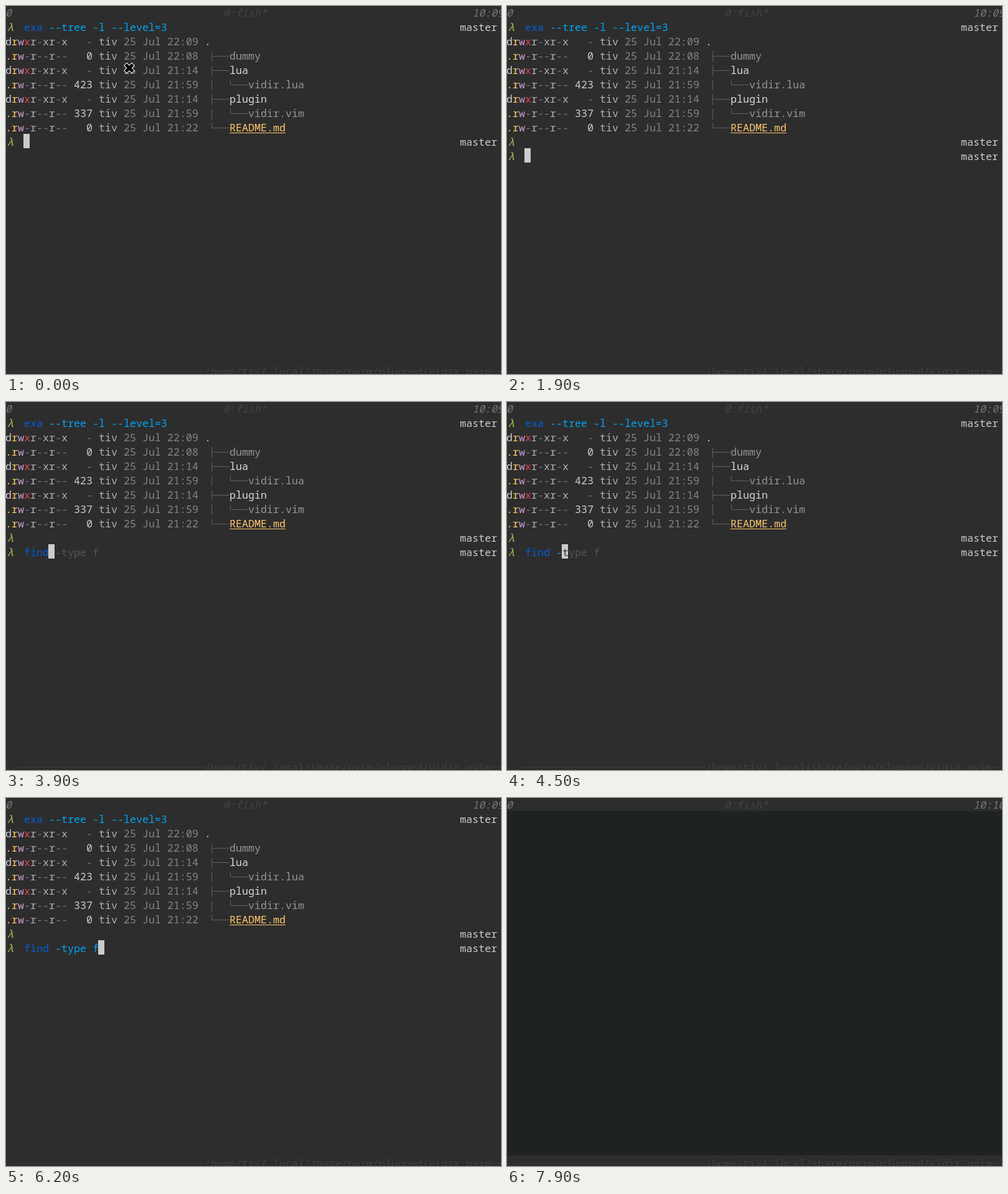
Animation of 795x590 px, one loop 8 s. Source, as an HTML page:

```html
<!DOCTYPE html>
<html lang="en">
<head>
<meta charset="utf-8">
<title>Terminal session</title>
<style>
  html, body { margin: 0; width: 100%; height: 100%; overflow: hidden; background: #2d2d2d; }
  #stage {
    position: relative; width: 795px; height: 590px; overflow: hidden;
    background: #2d2d2d; color: #ccc;
    font: 16.6667px/25px "Noto Sans Mono", "DejaVu Sans Mono", monospace;
    font-variant-ligatures: none;
  }
  .t { position: absolute; white-space: pre; height: 23px; }
  .prompt { color: #a5c254; font-style: italic; }
  .cmd { color: #005fd7; }
  .arg { color: #00a5f5; }
  .bad { color: #e60000; }
  .pipe { color: #178717; }
  .hint { color: #555; }
  .under { color: #2d2d2d; }
  .r { color: #ffcc66; }
  .w { color: #cc99cc; }
  .x { color: #e0464c; }
  .dim { color: #777; }
  .mid { color: #b0b0b0; }
  .date { color: #858585; }
  .file { color: #959595; }
  .dir { color: #d8d8d8; }
  .readme { color: #ffc66d; text-decoration: underline 1px; text-underline-offset: 2px; }
  .bar { font-style: italic; color: #777; }
  .faint { color: #444; }
  .path { color: #404040; }
  #block { position: absolute; width: 10px; height: 23px; background: #ccc; }
  #editor { position: absolute; left: 0; top: 21px; width: 795px; height: 552px; background: #1e2222; }
  svg { position: absolute; left: 0; top: 0; }
</style>
</head>
<body>
<div id="stage">
  <div id="shell"><div id="block"></div></div>
  <svg width="795" height="590">
    <g id="tree" fill="none" stroke="#606060"></g>
    <path d="M0 586.5h4M8 586.5h4M17 586.5h4M23 585.5H319M779 585.5H795" stroke="#3c3c3c" fill="none"/>
    <g id="cross" fill="none" stroke-linecap="square">
      <path d="M194 95.5L202 103.5M202 95.5L194 103.5" stroke="#fff" stroke-width="7"/>
      <path d="M194 95.5L202 103.5M202 95.5L194 103.5" stroke="#000" stroke-width="5"/>
    </g>
    <path id="arrow" d="M1 2V34L8.5 27L14 38.5L19 36L13.8 25.5H23Z" fill="#000" stroke="#fff" stroke-width="2"/>
  </svg>
  <div id="editor"></div>
</div>
<script>
  const LOOP = 8000;
  const $ = id => document.getElementById(id);
  const span = (cls, s) => `<span class="${cls}">${s}</span>`;

  function put(row, col, html, cls = "", parent = $("shell")) {
    const el = document.createElement("div");
    el.className = "t " + cls;
    el.style.left = col * 10 - 1 + "px";
    el.style.top = row * 23 - 2 + "px";
    el.innerHTML = html;
    parent.append(el);
    return el;
  }

  // status bars
  const stage = $("stage");
  put(0, 0, "0", "bar", stage);
  put(0, 35, "0:fish*", "bar faint", stage);
  const clock = put(0, 75, "10:09", "bar", stage);
  put(25, 32, "/home/tiv/.local/share/nvim/plugged/vidir.nvim", "path", stage);

  const prompt = row => [put(row, 0.3, "λ", "prompt"), put(row, 73, "master")];

  // directory listing
  function entry(row, size, time, col, name, cls) {
    const isDir = size === "-";
    const mode = isDir
      ? "d" + span("r", "r") + span("w", "w") + span("x", "x")
      : span("r", ".") + span("r", "r") + span("w", "w") + span("dim", "-");
    const rest = (isDir ? "r-xr-x" : "r--r--").replace(/[rx]|-+/g,
      s => span(s[0] === "-" ? "dim" : "mid", s));
    put(row, 0, mode + rest);
    put(row, 14 - size.length, size, isDir ? "dim" : "");
    put(row, 15, "tiv", "mid");
    put(row, 19, "25 Jul " + time, "date");
    put(row, col, name, cls);
  }

  prompt(1);
  put(1, 3, span("cmd", "exa") + span("arg", " --tree -l --level=3"));
  entry(2, "-", "22:09", 32, ".", "");
  entry(3, "0", "22:08", 36, "dummy", "file");
  entry(4, "-", "21:14", 36, "lua", "dir");
  entry(5, "423", "21:59", 39, "vidir.lua", "file");
  entry(6, "-", "21:14", 36, "plugin", "dir");
  entry(7, "337", "21:59", 39, "vidir.vim", "file");
  entry(8, "0", "21:22", 36, "README.md", "readme");

  const mid = row => row * 23 + 11.5;
  const bar = row => `M330.5 ${mid(row) - 8}v17`;
  const tee = row => `${bar(row)}M330.5 ${mid(row)}h28`;
  const elbow = (row, x) => `M${x} ${mid(row) - 8}v8h28`;
  $("tree").innerHTML = `<path d="${[
    tee(3), tee(4), bar(5), elbow(5, 360.5), tee(6), bar(7), elbow(7, 360.5), elbow(8, 330.5)
  ].join("")}"/>`;

  prompt(9);
  const second = prompt(10);
  const line = put(10, 3, "");

  // time, typed text, suggested rest
  const keys = [
    [0, "", ""],
    [2600, "f", "ind"],
    [2700, "fi", "nd"],
    [2800, "fin", "d"],
    [3900, "find", " -type f"],
    [4000, "find ", "-type f"],
    [4500, "find -", "type f"],
    [4800, "find -y", ""],
    [5200, "find -yt", ""],
    [5400, "find -y", ""],
    [5500, "find -", "type f"],
    [5600, "find -t", "ype f"],
    [5800, "find -ty", "pe f"],
    [6000, "find -typ", "e f"],
    [6100, "find -type", " f"],
    [6200, "find -type f", ""],
    [6300, "find -type f ", "| vidir -"],
    [6600, "find -type f |", " vidir -"],
    [6800, "find -type f | ", "vidir -"],
    [7000, "find -type f | vidir -", ""]
  ];

  // time, pointer tip
  const moves = [
    [500, 212, 158],
    [600, 147, 207],
    [800, 148, 183],
    [1100, 143, 184.5]
  ];

  const at = (list, t) => list.filter(k => k[0] <= t).pop();

  function colour(text) {
    return text.replace(/\S+/g, w =>
      span(w === "|" ? "pipe"
        : w === "find" || w === "vidir" ? "cmd"
        : text.length < 4 ? "bad" : "arg", w));
  }

  function draw(t) {
    const [, typed, hint] = at(keys, t);
    const entered = t >= 1900;
    line.innerHTML = colour(typed) + span("under", hint.slice(0, 1)) + span("hint", hint.slice(1));
    second.forEach(el => el.hidden = !entered);

    const block = $("block");
    block.hidden = t >= 7800;
    block.style.left = 28 + typed.length * 10 + "px";
    block.style.top = (entered ? 228 : 205) + "px";

    const tip = t < 1400 && at(moves, t);
    $("cross").style.display = t < 500 ? "" : "none";
    $("arrow").style.display = tip ? "" : "none";
    if (tip) $("arrow").setAttribute("transform", `translate(${tip[1]} ${tip[2]})`);

    const open = t >= 7900;
    $("editor").hidden = !open;
    $("shell").hidden = open;
    $("tree").style.display = open ? "none" : "";
    clock.textContent = open ? "10:10" : "10:09";
  }

  const start = performance.now();
  function tick() {
    draw((performance.now() - start) % LOOP);
    requestAnimationFrame(tick);
  }
  tick();
</script>
</body>
</html>
```
